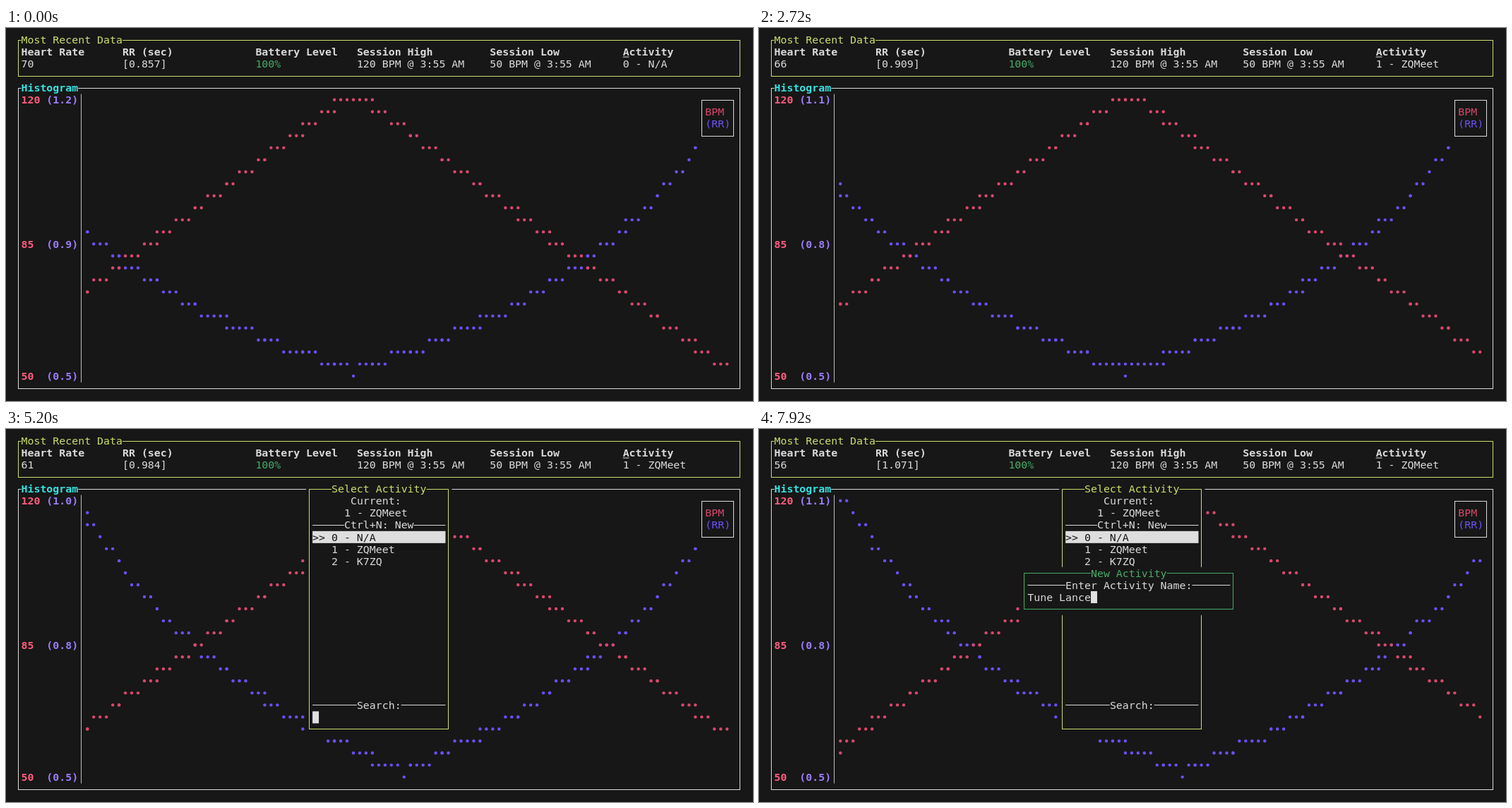
An HTML page with a canvas for the animation above (8000 ms loop, 1058x529 px).

```html
<!DOCTYPE html>
<html lang="en">
<head>
<meta charset="utf-8">
<title>Heart rate monitor</title>
<style>
  html, body { margin: 0; height: 100%; overflow: hidden; background: #171717; }
  canvas { display: block; width: 100vw; height: 100vh; }
</style>
</head>
<body>
<canvas id="screen" width="1058" height="529"></canvas>
<script>
const ctx = document.getElementById('screen').getContext('2d');
const LOOP = 8000, CELL_W = 8.97, CELL_H = 17.04, ORIGIN = 17;
const FONT = '14.9px "DejaVu Sans Mono", monospace';
const BG = '#171717', FG = '#dadada', LIME = '#c9df6c', GREEN = '#47ab66', CYAN = '#34e2e2';
const RED = '#d9486b', BLUE = '#6c50fa', RED_BOLD = '#ff5c7e', PURPLE = '#9a7cf8';

const CHAT = '1 - ZQMeet', GAME = '2 - K7ZQ', NONE = '0 - N/A';
const NEW_NAME = 'Tune Lance';

// Times in ms of each new reading, search text and typed letter
const BEATS = [520, 1080, 1680, 2120, 2800, 3320, 4000, 4600, 5200, 5720, 6400, 6920, 7400, 7920];
const SEARCH = [[1720, 'zq'], [1920, 'zqm']];
const KEYS = [5920, 6200, 6320, 6520, 6680, 6760, 6840, 7120, 7280, 7400];
const FIRST_MENU = 1000, CHOSEN = 2720, SECOND_MENU = 4080, NEW_DIALOG = 5320;

const passed = (times, t) => times.filter(time => time <= t).length;
// Centre of a terminal cell
const cx = col => ORIGIN + col * CELL_W;
const cy = row => ORIGIN + row * CELL_H;

function text(col, row, str, color = FG, bold = false) {
  ctx.font = (bold ? 'bold ' : '') + FONT;
  ctx.fillStyle = color;
  ctx.fillText(str, cx(col - 0.5), cy(row) + 5.2);
}

function fillCells(c0, r0, c1, r1, color) {
  const x = cx(c0 - 0.5), y = cy(r0 - 0.5);
  ctx.fillStyle = color;
  ctx.fillRect(x, y, cx(c1 + 0.5) - x, cy(r1 + 0.5) - y);
}

function hline(x0, x1, row, color) {
  ctx.fillStyle = color;
  ctx.fillRect(x0, Math.floor(cy(row)), x1 - x0, 1);
}

function vline(col, y0, y1, color) {
  ctx.fillStyle = color;
  ctx.fillRect(Math.floor(cx(col)), y0, 1, y1 - y0);
}

function box(c0, r0, c1, r1, color) {
  fillCells(c0, r0, c1, r1, BG);
  const left = Math.floor(cx(c0)), right = Math.floor(cx(c1)) + 1;
  const top = Math.floor(cy(r0)), bottom = Math.floor(cy(r1)) + 1;
  hline(left, right, r0, color);
  hline(left, right, r1, color);
  vline(c0, top, bottom, color);
  vline(c1, top, bottom, color);
}

function title(col, row, str, color, bold) {
  fillCells(col, row, col + str.length - 1, row, BG);
  text(col, row, str, color, bold);
}

function divider(c0, c1, row, col, str) {
  hline(cx(c0 - 0.5), cx(c1 + 0.5), row, FG);
  title(col, row, str, FG);
}

function header(bpm, activity) {
  box(0, 0, 114, 3, LIME);
  title(1, 0, 'Most Recent Data', LIME);
  const fields = [
    [1, 'Heart Rate', String(bpm)],
    [17, 'RR (sec)', `[${(60 / bpm).toFixed(3)}]`],
    [38, 'Battery Level', '100%', GREEN],
    [54, 'Session High', '120 BPM @ 3:55 AM'],
    [75, 'Session Low', '50 BPM @ 3:55 AM'],
    [96, 'Activity', activity],
  ];
  for (const [col, name, value, color] of fields) {
    text(col, 1, name, FG, true);
    text(col, 2, value, color);
  }
  ctx.fillStyle = FG;
  ctx.fillRect(cx(95.5), cy(1) + 6.5, CELL_W, 1);
}

function plot(values, low, high, color) {
  ctx.fillStyle = color;
  values.forEach((v, i) => {
    if (v > high) return;
    const col = 11 + Math.floor(i * 102 / 120);
    const row = 5 + Math.floor((high - v) / (high - low) * 23);
    // A later series replaces the dot in a shared cell
    ctx.beginPath();
    ctx.arc(cx(col) - 0.4, cy(row) - 0.5, 2.2, 0, 7);
    ctx.fill();
  });
}

function histogram(beat) {
  // Newest reading first: a climb back to 120, then a fall
  const bpm = Array.from({ length: 121 }, (_, i) => 120 - Math.abs(i - 50 - beat));
  const rr = bpm.map(b => 60 / b);
  // The RR scale trails the data by one reading
  const high = Math.max(...rr.slice(1)), low = Math.min(...rr.slice(1));

  box(0, 4, 114, 29, FG);
  title(1, 4, 'Histogram', CYAN, true);
  vline(10, cy(4.5), cy(28.5), '#bdbdbd');
  const labels = [[5, '120', high], [17, '85', (high + low) / 2], [28, '50', low]];
  for (const [row, beats, sec] of labels) {
    text(1, row, beats, RED_BOLD, true);
    text(5, row, `(${(sec + 1e-6).toFixed(1)})`, PURPLE, true);
  }
  plot(rr.slice(0, 120), low, high, BLUE);
  plot(bpm.slice(0, 120), 50, 120, RED);

  box(108, 5, 113, 8, FG);
  text(109, 6, 'BPM', RED);
  text(109, 7, '(RR)', BLUE);
}

function cursor(col, row) {
  fillCells(col, row, col, row, '#e0e0e0');
}

function activityMenu(current, items, search, focused) {
  box(46, 4, 68, 24, LIME);
  title(50, 4, 'Select Activity', LIME);
  text(53, 5, 'Current:');
  text(57 - Math.floor(current.length / 2), 6, current);
  divider(47, 67, 7, 52, 'Ctrl+N: New');
  fillCells(47, 8, 67, 8, '#dedede');
  items.forEach((item, i) => text(50, 8 + i, item, i ? FG : BG));
  text(47, 8, '>>', BG);
  divider(47, 67, 22, 54, 'Search:');
  text(47, 23, search);
  if (focused) cursor(47 + search.length, 23);
}

function newActivity(name) {
  box(40, 11, 73, 14, GREEN);
  title(51, 11, 'New Activity', GREEN);
  divider(41, 72, 12, 47, 'Enter Activity Name:');
  text(41, 13, name);
  cursor(41 + name.length, 13);
}

function draw(t) {
  const beat = passed(BEATS, t);
  const activity = t < CHOSEN ? NONE : CHAT;
  ctx.fillStyle = BG;
  ctx.fillRect(0, 0, 1058, 529);
  header(70 - beat, activity);
  histogram(beat);

  if (t >= FIRST_MENU && t < CHOSEN) {
    const typed = passed(SEARCH.map(s => s[0]), t);
    const search = typed ? SEARCH[typed - 1][1] : '';
    const items = [CHAT, GAME].filter(s => s.toLowerCase().includes(search));
    activityMenu(activity, items, search, true);
  } else if (t >= SECOND_MENU) {
    activityMenu(activity, [NONE, CHAT, GAME], '', t < NEW_DIALOG);
  }
  if (t >= NEW_DIALOG) newActivity(NEW_NAME.slice(0, passed(KEYS, t)));
}

const start = performance.now();
function tick() {
  draw((performance.now() - start) % LOOP);
  requestAnimationFrame(tick);
}
tick();
</script>
</body>
</html>
```
